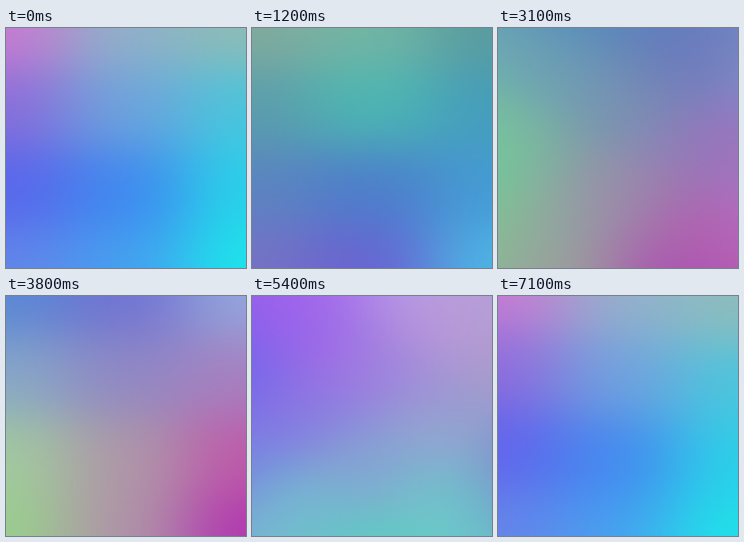
Recreate the animation shown at these times as an HTML page with a canvas. Size 300 by 300 pixels, loop 7200 ms.

```html
<!DOCTYPE html>
<html>
<head>
<meta charset="utf-8">
<style>
  html, body { margin: 0; width: 100%; height: 100%; overflow: hidden; }
  canvas { display: block; width: 100vw; height: 100vh; }
</style>
</head>
<body>
<canvas id="stage" width="100" height="100"></canvas>
<script>
const LOOP = 7200, STEP = 100, SIZE = 100, COLS = 3, ROWS = 4;

// Each pose: start time, degrees turned until the next pose, colour mesh row by row.
const poses = [
  [0, 60, 'cc7ad0 90b2c8 90bcb4  8a6cda 6ea4dc 48c6dc  5864ec 3e86f0 28d4ea  6486e8 46a0f0 1ae8ea'],
  [1200, 60, '84aa9c 74b6a4 5a9a9e  5a9cac 4abab2 449cbc  5c84c0 4c7ccc 449cd4  7872c4 6a60d2 4cbae6'],
  [2400, 50, '50b49c 5096a0 5488a8  4ac29a 5c9ca0 6478a8  74b894 8684ae 9060b8  8eb08c a060b4 b272ca'],
  [3800, 20, '5888d6 7070d2 94aade  88a8c8 9088c4 a880c0  a2cc9e ae98a8 c058a8  98d08c b094a8 b034b0'],
  [4500, 65, '6056ea 8a70e0 a8c2ee  9470d8 a86cd4 b494cc  a8b4bc a4a8b8 a87cb4  86d2a4 90c6ac 6a48b0'],
  [6300, 35, 'c84ef2 c0a0e4 acc0e0  b054f4 9090ec 84c8ec  7c70f0 6898ec 50d0e8  6090ec 40c4e4 20d2d6']
].map(([start, turn, mesh]) => ({
  start,
  turn: turn * Math.PI / 180,
  mesh: mesh.split(/ +/).map(hex => [0, 2, 4].map(i => parseInt(hex.substr(i, 2), 16)))
}));

const ctx = document.getElementById('stage').getContext('2d');
const image = ctx.createImageData(SIZE, SIZE);

// Normalised bell weights of the mesh lines around position p (0..1).
function weights(p, count) {
  const w = Array.from({ length: count }, (_, i) => Math.exp(-2.5 * (p * (count - 1) - i) ** 2));
  const sum = w.reduce((a, b) => a + b);
  return w.map(v => v / sum);
}

// Adds one pose, turned counterclockwise by angle, to the accumulated colours.
function addPose(sum, mesh, angle, alpha) {
  const c = Math.cos(angle), s = Math.sin(angle);
  for (let i = 0; i < SIZE * SIZE; i++) {
    const x = (i % SIZE + 0.5) / SIZE - 0.5;
    const y = (Math.floor(i / SIZE) + 0.5) / SIZE - 0.5;
    const wx = weights(x * c - y * s + 0.5, COLS);
    const wy = weights(x * s + y * c + 0.5, ROWS);
    mesh.forEach((rgb, n) => {
      const w = alpha * wx[n % COLS] * wy[Math.floor(n / COLS)];
      for (let k = 0; k < 3; k++) sum[i * 3 + k] += w * rgb[k];
    });
  }
}

function draw(time) {
  const index = poses.filter(p => p.start <= time).length - 1;
  const from = poses[index], to = poses[(index + 1) % poses.length];
  const u = (time - from.start) / ((to.start || LOOP) - from.start);
  const sum = new Float32Array(SIZE * SIZE * 3);
  addPose(sum, from.mesh, u * from.turn, 1 - u);
  if (u > 0) addPose(sum, to.mesh, (u - 1) * from.turn, u);
  for (let i = 0; i < SIZE * SIZE; i++) {
    for (let k = 0; k < 3; k++) image.data[i * 4 + k] = sum[i * 3 + k];
    image.data[i * 4 + 3] = 255;
  }
  ctx.putImageData(image, 0, 0);
}

const begin = performance.now();
let shown = -1;
function tick() {
  const time = Math.floor((performance.now() - begin) % LOOP / STEP) * STEP;
  if (time !== shown) draw(shown = time);
  requestAnimationFrame(tick);
}
tick();
</script>
</body>
</html>
```
